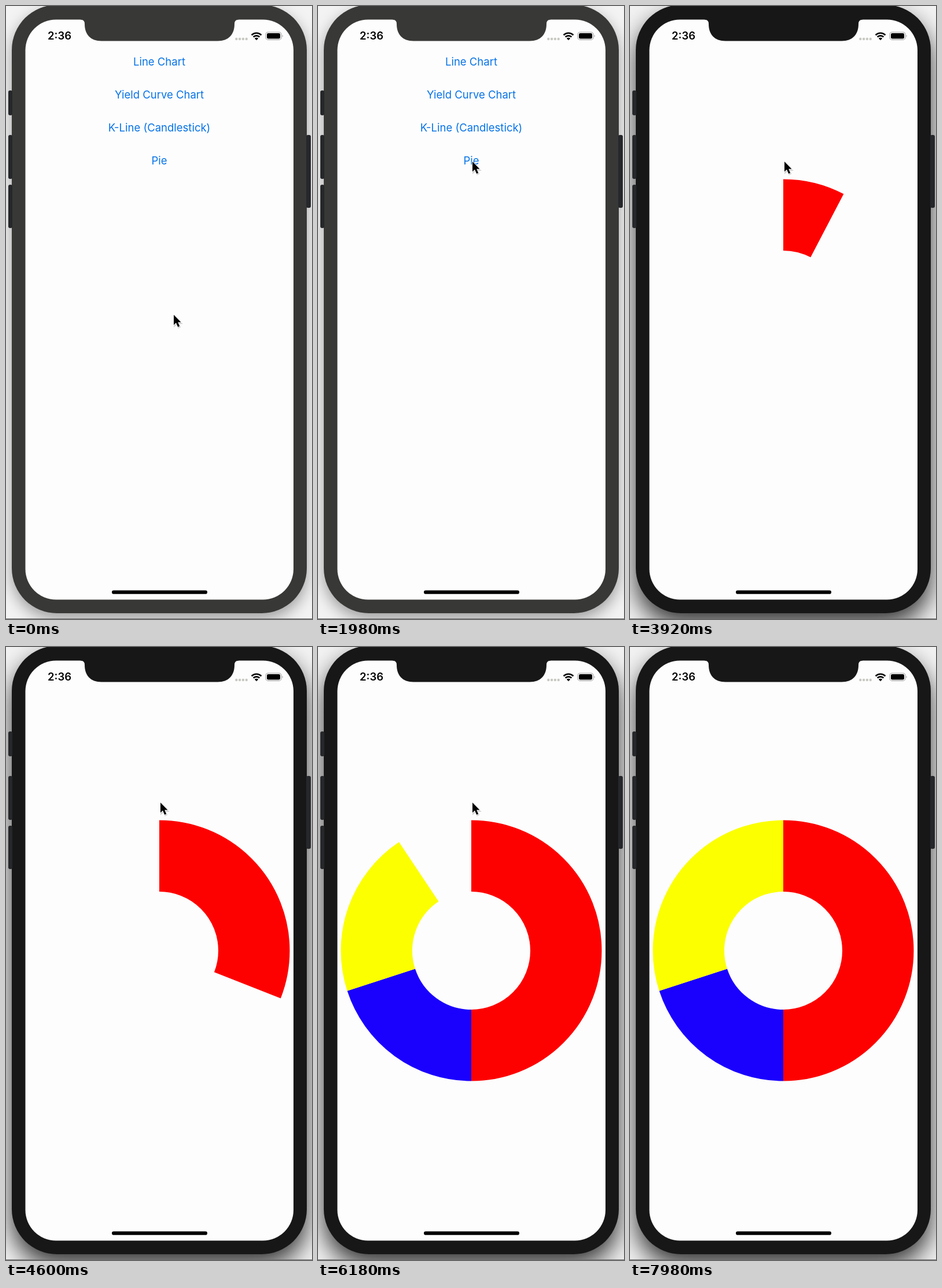
These frames come from a looping animation (529x1060 px, 8000 ms). An HTML page:

```html
<!DOCTYPE html>
<html lang="en">
<head>
<meta charset="utf-8">
<title>Charts</title>
<style>
html, body { margin: 0; width: 100%; height: 100%; overflow: hidden; background: #f3f3f3; }
#body { position: absolute; left: 10px; top: -2px; width: 510px; height: 1052px; border-radius: 78px;
  background: #383836; box-shadow: 0 10px 26px rgba(0,0,0,.36); }
.active #body { background: #171717; box-shadow: 0 20px 42px rgba(0,0,0,.78); }
svg { position: absolute; left: 0; top: 0; font: 18.5px Inter, sans-serif; }
#menu { fill: #0673e8; text-anchor: middle; }
.notch { fill: #383836; }
.active .notch { fill: #171717; }
</style>
</head>
<body>
<div id="body"></div>
<svg width="529" height="1060" viewBox="0 0 529 1060">
  <g fill="#25272a">
    <rect x="4" y="146" width="7" height="43" rx="3"/>
    <rect x="4" y="223" width="7" height="76" rx="3"/>
    <rect x="4" y="309" width="7" height="75" rx="3"/>
    <rect x="519" y="223" width="8" height="126" rx="3"/>
  </g>
  <rect y="1059" width="529" height="1" fill="#6b6b6b"/>
  <rect x="33.5" y="23.5" width="463.5" height="1003" rx="53" fill="#fdfdfd"/>
  <path class="notch" d="M129 22V23.5Q136 23.5 136 31C136 49 146 60.5 165 60.5H366C385 60.5 395 49 395 31Q395 23.5 402 23.5V22Z"/>

  <text x="72" y="58.3" font-weight="600">2:36</text>
  <g fill="#c8c8c2">
    <circle cx="398.3" cy="57" r="2.2"/><circle cx="404.1" cy="57" r="2.2"/>
    <circle cx="409.9" cy="57" r="2.2"/><circle cx="415.7" cy="57" r="2.2"/>
  </g>
  <g fill="none" stroke="#000" stroke-width="2.7">
    <path d="M424.6 50.2A12 12 0 0 1 441.4 50.2M427.7 53.5A7.5 7.5 0 0 1 438.3 53.5"/>
  </g>
  <path d="M433 59.3L429.8 56A4.6 4.6 0 0 1 436.2 56Z"/>
  <rect x="449" y="45.2" width="27" height="13.2" rx="4" fill="none" stroke="#a2a2a2" stroke-width="1.1"/>
  <rect x="451" y="47.1" width="23" height="9.4" rx="2.3"/>
  <path d="M477.6 49.7Q479.6 51.8 477.6 54Z" fill="#999"/>
  <rect x="183" y="1010.5" width="165" height="6.3" rx="3.1"/>

  <g id="menu">
    <text x="265" y="103">Line Chart</text>
    <text x="265" y="160">Yield Curve Chart</text>
    <text x="265" y="217">K-Line (Candlestick)</text>
    <text x="265" y="273.5">Pie</text>
  </g>
  <g id="pie" fill="none" stroke-width="123.5"></g>
  <g id="cursor">
    <path d="M1 2V19.5L5 16L8 22.5L11 21L8.300 15H13.500Z" fill="#000" opacity=".16" stroke="#000" stroke-width="2"/>
    <path d="M0 0V17.500L4 13.800L7.200 21L10.200 19.700L7.200 12.700H12.500Z" stroke="#fff" stroke-width="1.6" paint-order="stroke"/>
  </g>
</svg>
<script>
const LOOP = 8000, ACTIVE_AT = 3220, PIE_AT = 3640;
const $ = id => document.getElementById(id);
const clamp = (v, lo, hi) => Math.min(hi, Math.max(lo, v));

// Piecewise linear value at x; each key is [x, ...values]
function track(keys, x) {
  const i = clamp(keys.findIndex(k => k[0] > x), 1, keys.length - 1);
  const last = x >= keys[keys.length - 1][0];
  const [a, b] = last ? keys.slice(-2) : [keys[i - 1], keys[i]];
  const p = clamp((x - a[0]) / (b[0] - a[0]), 0, 1);
  return a.slice(1).map((v, j) => v + (b[j + 1] - v) * p);
}

// Three quick steps in every 140 ms, the third one held
function stepAt(t) {
  const u = t + 20;
  return 3 * Math.floor(u / 140) + Math.min(2, Math.floor(u % 140 / 20));
}

const sweep = [[80.4, 0], [113, 195.4], [139.4, 360]];
const path = [[8, 290, 534], [23, 281, 380], [42, 267, 269], [162, 267, 269], [169, 535, 330]];

const slices = [[0, 180, '#fd0000'], [180, 72, '#1a00fd'], [252, 108, '#fbff00']].map(([start, span, color]) => {
  const el = document.createElementNS('http://www.w3.org/2000/svg', 'circle');
  const attrs = { cx: 265, cy: 525, r: 163.75, pathLength: 360, stroke: color,
    transform: `rotate(${start - 90} 265 525)` };
  for (const k in attrs) el.setAttribute(k, attrs[k]);
  $('pie').append(el);
  return { el, start, span };
});

function draw(t) {
  const n = stepAt(t);
  document.body.className = t >= ACTIVE_AT ? 'active' : '';
  $('menu').style.display = t < PIE_AT ? '' : 'none';
  const [angle] = track(sweep, n);
  for (const { el, start, span } of slices) {
    const size = clamp(angle - start, 0, span);
    el.style.display = size > 0 ? '' : 'none';
    el.setAttribute('stroke-dasharray', `${size} 360`);
  }
  const [x, y] = track(path, n);
  $('cursor').setAttribute('transform', `translate(${x} ${y})`);
}

const begin = performance.now();
function tick() {
  draw((performance.now() - begin) % LOOP);
  requestAnimationFrame(tick);
}
tick();
</script>
</body>
</html>
```
